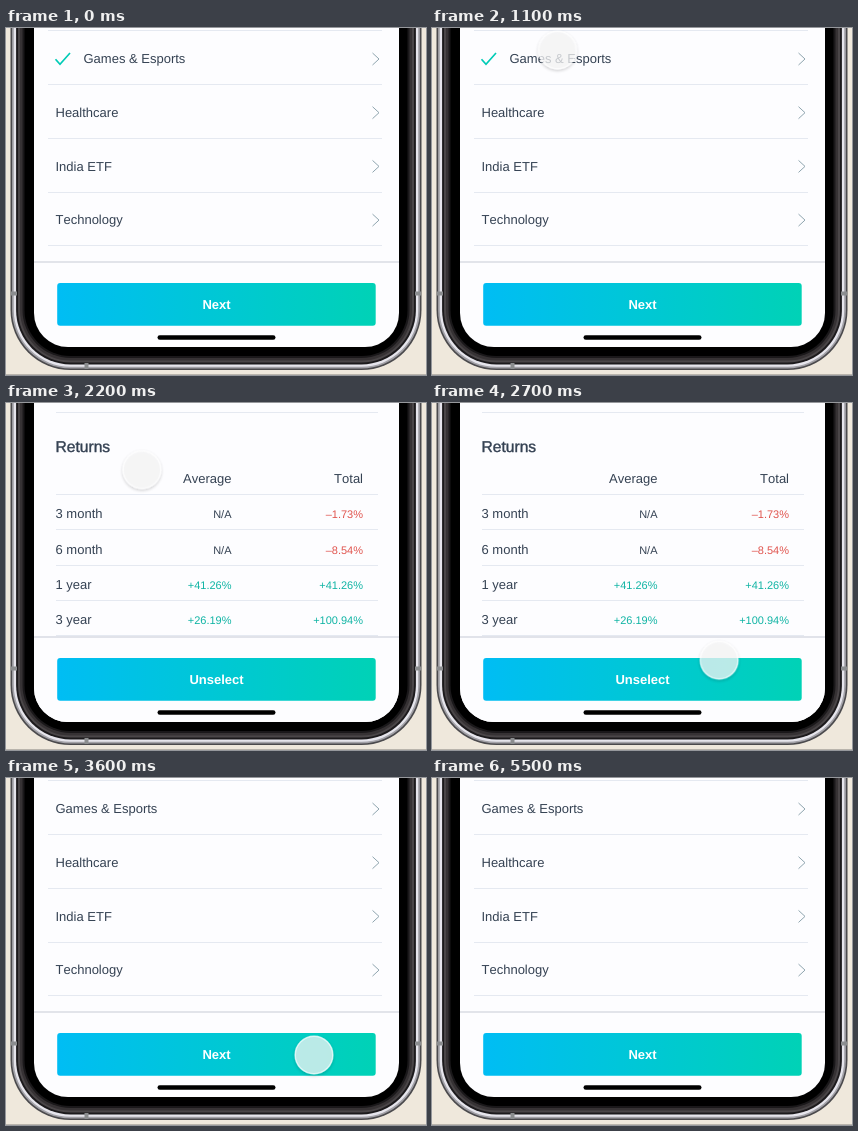
These frames come from a looping animation (420x347 px, 5600 ms). An HTML page:

```html
<!DOCTYPE html>
<html lang="en">
<head>
<meta charset="utf-8">
<title>Theme picker</title>
<style>
  html, body { margin: 0; width: 100%; height: 100%; overflow: hidden; background: #efe8dc; }
  svg { display: block; width: 420px; height: 347px; font: 13px "Liberation Sans", Arial, sans-serif; }
  text { fill: #354253; font-kerning: none; text-rendering: geometricPrecision; }
  .title { font-size: 15.6px; stroke: #354253; stroke-width: .4px; }
  .action { font-weight: bold; fill: #fff; text-anchor: middle; }
  .value { font-size: 11px; }
  .right { text-anchor: end; }
  .up { fill: #10b4a4; }
  .down { fill: #e0544e; }
  .rule { stroke: #e5e9f1; }
  .chevron { fill: none; stroke: #8ea4ae; }
  .tick { fill: none; stroke: #00cbb6; stroke-width: 1.7; }

  .detail, .tick, .choice, .touch, .touch circle { animation: 5.6s linear infinite; }
  .detail { animation-name: push; }
  .tick { animation-name: untick; animation-timing-function: step-end; }
  .choice { animation-name: outdent; animation-timing-function: step-end; }
  .touch {
    offset-path: path("M125.5 22Q126 106 308 277");
    offset-rotate: 0deg;
    animation-name: travel;
  }
  .touch circle { animation-name: press; }

  @keyframes push {
    0%, 22.32% { transform: translateX(366px); animation-timing-function: cubic-bezier(.333, .667, .667, 1); }
    30.8% { transform: none; animation-timing-function: step-end; }
    60.7%, 100% { transform: translateX(366px); }
  }
  @keyframes untick { 0% { opacity: 1; } 50%, 100% { opacity: 0; } }
  @keyframes outdent { 0% { transform: translateX(28px); } 50%, 100% { transform: none; } }
  @keyframes travel {
    0%, 34.82% { offset-distance: 0%; animation-timing-function: ease-in-out; }
    51.79%, 100% { offset-distance: 100%; }
  }
  @keyframes press {
    0%, 16% { opacity: 0; }
    19%, 76% { opacity: 1; }
    82%, 100% { opacity: 0; }
  }
</style>
</head>
<body>
<svg viewBox="0 0 420 347">
  <defs>
    <linearGradient id="fill">
      <stop stop-color="#00bdf4"/>
      <stop offset="1" stop-color="#00d2b6"/>
    </linearGradient>
    <clipPath id="screen"><rect x="28" y="-100" width="365" height="419" rx="34"/></clipPath>
    <filter id="shadow" x="-30%" y="-30%" width="160%" height="160%">
      <feDropShadow dx="0" dy="1.4" stdDeviation="1.4" flood-opacity=".24"/>
    </filter>
    <g id="footer">
      <path d="M28 234H393" stroke="#d8dbe3" stroke-width="1.4"/>
      <rect x="51.2" y="255" width="318.5" height="42.7" rx="3" fill="url(#fill)"/>
      <rect x="151.5" y="307.3" width="118" height="4.5" rx="2.25"/>
    </g>
  </defs>

  <rect width="420" height="347" fill="#efe8dc"/>
  <rect y="346" width="420" height="1" fill="#b9b4ac"/>
  <g id="frame"></g>

  <g clip-path="url(#screen)">
    <rect x="28" width="365" height="320" fill="#fdfdff"/>
    <g id="list">
      <path class="tick" d="M49.5 31.2L54 36.2L64 25"/>
      <use href="#footer"/>
      <text class="action" x="210.5" y="281.2">Next</text>
    </g>
    <g class="detail" id="detail">
      <rect x="28" width="366" height="320" fill="#fdfdff"/>
      <path class="rule" d="M50 9.5H372"/>
      <text class="title" x="49.5" y="49">Returns</text>
      <text class="right" x="225.5" y="80">Average</text>
      <text class="right" x="357" y="80">Total</text>
      <path class="rule" d="M50 91.5H372"/>
      <use href="#footer"/>
      <text class="action" x="210.5" y="281.2">Unselect</text>
    </g>
  </g>

  <g class="touch">
    <circle r="18.8" fill="#f9f9fa" fill-opacity=".72" stroke="#fff" stroke-opacity=".75" stroke-width="1.4" filter="url(#shadow)"/>
  </g>
</svg>
<script>
  const add = (id, markup) =>
    document.getElementById(id).insertAdjacentHTML("beforeend", markup);

  // Phone shell: nested rounded bands, each given as inset and colour.
  const bands = [[0, "#4b4a4d"], [1.6, "#a3a2a8"], [3.3, "#e6e5ec"], [5.6, "#1c1a1c"], [7.5, "#4a4648"], [9.5, "#363234"], [12, "#1a181a"], [14, "#000"]];
  for (const [inset, color] of bands) {
    add("frame", `<rect x="${4.5 + inset}" y="-200" width="${411 - 2 * inset}" height="${542 - inset}" rx="${60 - inset}" fill="${color}"/>`);
  }
  add("frame", `<path d="M5 265.5H11M409 265.5H415M80.5 335V341" stroke="#8b8d8f" stroke-width="4"/>`);

  add("list", `<path class="rule" d="M42 2.5H376"/>`);
  ["Games &amp; Esports", "Healthcare", "India ETF", "Technology"].forEach((name, i) => {
    const y = 31 + i * 53.7;
    const line = Math.floor(y + 25.7) + .5;
    add("list", `<text class="${i ? "" : "choice"}" x="49.5" y="${Math.round(y + 4.2)}">${name}</text>
      <path class="chevron" d="M366.5 ${y - 6}l6.5 6l-6.5 6"/>
      <path class="rule" d="M42 ${line}H376"/>`);
  });

  const tone = value => value[0] === "+" ? "up" : value[0] === "–" ? "down" : "";
  const cell = (x, y, value) =>
    `<text class="value right ${tone(value)}" x="${x}" y="${y}">${value}</text>`;
  [
    ["3 month", "N/A", "–1.73%"],
    ["6 month", "N/A", "–8.54%"],
    ["1 year", "+41.26%", "+41.26%"],
    ["3 year", "+26.19%", "+100.94%"]
  ].forEach(([period, average, total], i) => {
    const y = Math.round(115.4 + i * 35.3);
    add("detail", `<text x="49.5" y="${y}">${period}</text>
      ${cell(225.5, y, average)}${cell(357, y, total)}
      <path class="rule" d="M50 ${y + 11.5}H372"/>`);
  });
</script>
</body>
</html>
```
